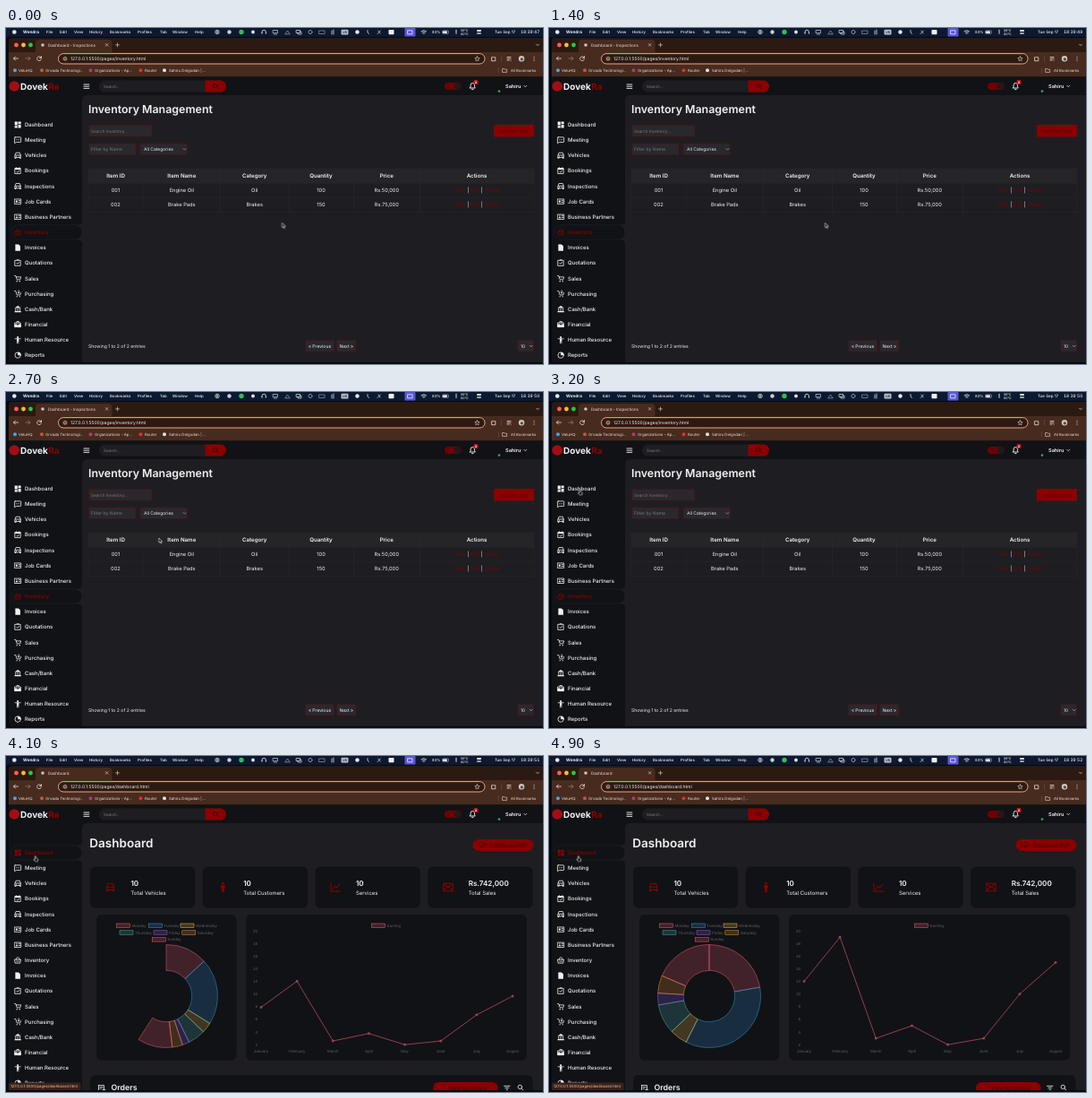
Animation of 600 by 375 pixels, one loop 5000 ms. Source, as an HTML page:

```html
<!DOCTYPE html>
<html lang="en">
<head>
<meta charset="utf-8">
<title>Dashboard</title>
<style>
html, body { margin: 0; width: 100%; height: 100%; overflow: hidden; background: #050a14; }
svg { display: block; width: 100vw; height: 100vh; color: #f1f1f4; fill: currentColor;
  font-family: Inter, "Open Sans", sans-serif; text-rendering: geometricPrecision; }
text { white-space: pre; }
.b { font-weight: 600; }
.h { font-weight: 700; }
.n { font-weight: 500; }
.m { text-anchor: middle; }
.e { text-anchor: end; }
.s { fill: none; stroke: currentColor; stroke-width: .8; stroke-linecap: round; stroke-linejoin: round; }
.arial { font-family: "Liberation Sans", Arial, sans-serif; fill: #5b5c60; }
.num { font-feature-settings: "tnum"; }

.old, .new, .idle, .hover, .url1, .url2, .load, .rest, .arrow, .hand, .leave, .enter, #mouse {
  animation: 5s step-end infinite; }
.old { animation-name: until78; }
.new { animation-name: from78; }
.idle { animation-name: until66; }
.hover { animation-name: from66; }
.url1 { animation-name: until74; }
.url2 { animation-name: from74; }
.load { animation-name: loading; }
.rest { animation-name: notloading; }
.arrow { animation-name: until62; }
.hand { animation-name: from62; }
.leave { animation-name: leave; }
.enter { animation-name: enter; }
#mouse { animation-name: travel; animation-timing-function: ease-in-out; }
@keyframes until78 { 0% { opacity: 1 } 78%, 100% { opacity: 0 } }
@keyframes from78 { 0% { opacity: 0 } 78%, 100% { opacity: 1 } }
@keyframes until66 { 0% { opacity: 1 } 66%, 100% { opacity: 0 } }
@keyframes from66 { 0% { opacity: 0 } 66%, 100% { opacity: 1 } }
@keyframes until74 { 0% { opacity: 1 } 74%, 100% { opacity: 0 } }
@keyframes from74 { 0% { opacity: 0 } 74%, 100% { opacity: 1 } }
@keyframes until62 { 0% { opacity: 1 } 62%, 100% { opacity: 0 } }
@keyframes from62 { 0% { opacity: 0 } 62%, 100% { opacity: 1 } }
@keyframes loading { 0% { opacity: 0 } 74% { opacity: 1 } 78%, 100% { opacity: 0 } }
@keyframes notloading { 0% { opacity: 1 } 74% { opacity: 0 } 78%, 100% { opacity: 1 } }
@keyframes leave { 0% { color: #8b0000 } 78%, 100% { color: #f1f1f4 } }
@keyframes enter { 0% { color: #f1f1f4 } 78%, 100% { color: #8b0000 } }
@keyframes travel {
  0%, 46% { transform: translate(308.5px, 217.5px) }
  62%, 65% { transform: translate(34.4px, 108.8px) }
  70%, 100% { transform: translate(32.9px, 111.6px) }
}
</style>
</head>
<body>
<svg id="stage" viewBox="0 0 600 375" preserveAspectRatio="none"></svg>
<script>
const PANEL = '#111215', MAIN = '#1e1e22', RED = '#8b0000', DIM = '#4a0709';

const text = (x, y, s, size, cls = '', fill = 'currentColor') =>
  `<text x="${x}" y="${y}" font-size="${size}" class="${cls}" style="fill:${fill}">${s}</text>`;
const label = (x, y, s, cls = '') => `<text x="${x}" y="${y}" font-size="4.5" class="arial ${cls}">${s}</text>`;
const rect = (x, y, w, h, fill, r = 0, more = '') =>
  `<rect x="${x}" y="${y}" width="${w}" height="${h}" rx="${r}" fill="${fill}" ${more}/>`;
const dot = (x, y, r, fill, more = '') => `<circle cx="${x}" cy="${y}" r="${r}" fill="${fill}" ${more}/>`;
const line = (d, color = 'currentColor', w = .8) =>
  `<path d="${d}" class="s" style="stroke:${color};stroke-width:${w}"/>`;
const group = (cls, body, color) => `<g class="${cls}"${color ? ` color="${color}"` : ''}>${body}</g>`;
const icon = (x, y, [solid, stroke], scale = 1) =>
  `<g transform="translate(${x} ${y}) scale(${scale})"><path d="${solid}"/><path class="s" d="${stroke}"/></g>`;
const box = (x, y, w, h) => rect(x, y, w, h, '#29292d', 1, 'stroke="#5e080b" stroke-width=".6"');
const chevron = (x, y, c) => line(`M${x - 1.5} ${y - .7}l1.5 1.5 1.5-1.5`, c, .7);
const lens = (x, y, c) => line(`M${x + 1.2} ${y + 1.2}l2 2M${x + 1.5} ${y - .6}a2.2 2.2 0 1 0-4.4 0 2.2 2.2 0 0 0 4.4 0z`, c);

// [name, solid path, stroked path], drawn around 0,0
const car = ['M-3.5 2.2h1.7v1.4h-1.7zM1.8 2.2h1.7v1.4h-1.7z',
  'M-3.1-.2l1-2.8h4.2l1 2.8v2.5h-6.2zM-3-.2h6M-1.8 1.1h.2M1.7 1.1h.2'];
const items = [
  ['Dashboard', 'M-3.5-3.5h3.1v4h-3.1zM.4-3.5h3.1v2.5H.4zM-3.5 1.3h3.1v2.2h-3.1zM.4-.2h3.1v3.7H.4z', ''],
  ['Meeting', '', 'M-3-3.2h6q.5 0 .5.6v4.4q0 .6-.5.6h-4.6l-2 1.2v-6.2q0-.6.6-.6zM-1.6-.3h.1M0-.3h.1M1.6-.3h.1'],
  ['Vehicles', ...car],
  ['Bookings', 'M-3-3h6v1.8h-6z', 'M-3-2.8h6v6h-6zM-1.7-3.6v.8M1.7-3.6v.8M-1.2 1l.9.9 1.6-1.7'],
  ['Inspections', ...car],
  ['Job Cards', 'M-2.4-1.2h2v2.4h-2z', 'M-3.5-2.7h7v5.4h-7zM.9-1h1.5M.9.8h1.5'],
  ['Business Partners', 'M-2.4.2h2.2v1.3h-2.2zM-1.9-1.5h1.2v1.3h-1.2z', 'M-3.5-2.7h7v5.4h-7zM1-1.1h1.4M1 .7h1.4'],
  ['Inventory', '', 'M-3.4-.8h6.8l-.8 4h-5.2zM-2-.8l1.3-2.4M2-.8L.7-3.2M-1 .8v1M1 .8v1'],
  ['Invoices', 'M-2.8-3.6h3.5l2.1 2.1v5.1h-5.6z', ''],
  ['Quotations', '', 'M-3-2.9h6v6h-6zM-1.3.1l1 1 1.8-2M-1-3.5h2'],
  ['Sales', 'M-1.6 2.6h1.2v1.2h-1.2zM1.5 2.6h1.2v1.2H1.5z', 'M-3.6-3h1.2l1.4 4.4h3.6l.9-2.9h-5.3'],
  ['Purchasing', 'M-1.6 2.6h1.2v1.2h-1.2zM1.5 2.6h1.2v1.2H1.5z', 'M-3.6-3h1.2l1.4 4.4h3.6l.9-2.4M1-3.6v3M-.1-1.5L1-.5l1.1-1'],
  ['Cash/Bank', 'M-3.6-1.2L0-3.6l3.6 2.4zM-3.6 2.3h7.2v1.3h-7.2z', 'M-2.4-.6v2.6M0-.6v2.6M2.4-.6v2.6'],
  ['Financial', 'M-3.5-.3h2.8v1H.7v-1h2.8v3.4h-7z', 'M-3.2-1.8h6.4v4.6h-6.4zM-1.2-2v-1.3h2.4V-2'],
  ['Human Resource', 'M-.9-3.8h1.8V-2H-.9zM-1.1-1.4h2.2v3.2h-2.2z', 'M-3-1.2h6M-.7 1.5v2.3M.7 1.5v2.3'],
  ['Reports', 'M0-3.4A3.4 3.4 0 0 1 3.4 0H0z', 'M3.2 0A3.2 3.2 0 1 1 0-3.2 3.2 3.2 0 0 1 3.2 0z'],
];
const rowY = i => 107.9 + i * 17.15;
const ring = y => `<path fill="${MAIN}" d="M85.2 ${y - 13.5}q0 5-5 5H14a8.5 8.5 0 0 0 0 17h66.2q5 0 5 5z"/>`
  + rect(6.2, y - 7.7, 78.4, 15.4, PANEL, 7.7);

function menuBar() {
  const menus = [[45, 'File'], [60, 'Edit'], [76, 'View'], [93, 'History'], [116, 'Bookmarks'],
    [147, 'Profiles'], [172, 'Tab'], [186, 'Window'], [211, 'Help']];
  const pale = '#dfe3ea';
  return rect(0, 0, 600, 10, '#0c1930') + dot(9.3, 4.5, 2.3, '#e8eaf0')
    + text(19, 6.1, 'Wendra', 4.7, 'h')
    + menus.map(([x, s]) => text(x, 6.1, s, 4.35, 'n')).join('')
    + dot(236, 4.5, 2.2, 'none', 'stroke="#eee" stroke-width=".8"') + dot(236, 4.5, 1, '#eee')
    + dot(249.5, 4.5, 2.2, '#c9ced8') + dot(263, 4.5, 2.7, '#2fbf54') + dot(276, 4.5, 1.9, pale)
    + line('M286 5.5v-1a2.2 2.2 0 0 1 4.4 0v1M286 5.2v1M290.4 5.2v1')
    + line('M298.5 2.5h5v3.2h-5zM299.5 7h3', '#c9ced8', .7)
    + line('M312 6.5l2.5-3.5 2.5 3.5z', '#98a0b0', .7)
    + line('M324.5 2.5h4v3h-4zM326 5.5V7h4V4h-1.5', pale, .7)
    + dot(340, 4.5, 2, 'none', `stroke="${pale}" stroke-width="1" stroke-dasharray="1 .5"`)
    + line('M350 3h6v3.5h-6z', '#aab', .6) + line('M364 3v4M366 2v5', pale)
    + rect(374.5, 1.8, 8, 5.6, '#b9c0cd', 1) + text(378.5, 6.2, 'US', 3.7, 'm b', '#14203a')
    + dot(392.5, 4.5, 2.2, '#e8eaf0') + line('M404 2.5V5l1.5 1.5', pale)
    + line('M415 6.5l3.5-3.5M416 3l2 3', pale, .7) + rect(427.5, 2, 6, 5.2, '#f0f1f4', .8)
    + rect(445.5, 0, 12, 9.5, '#5a55d8', 1.2) + line('M449 2.8h5v4h-5z', '#fff', .7)
    + line('M464 3.8q2.8-2.4 5.6 0M465.3 5.2q1.5-1.2 3 0M466.8 6.5h.1', '#fff')
    + text(476, 6.1, '83%', 4.2, 'n')
    + rect(487.5, 2.8, 7, 3.6, 'none', 1, 'stroke="#ccd" stroke-width=".5"') + rect(488.1, 3.4, 4.8, 2.4, '#fff', .4)
    + line('M503 2.2v3.2M503 6.3h.1', pale, 1)
    + text(508, 4.1, '56°C', 3.5, 'n') + text(508, 7.8, '60°C', 3.5, 'n')
    + rect(526, 2, 5, 2, '#e8eaf0', 1) + rect(526, 5, 5, 2, '#9aa3b5', 1)
    + text(546, 6.1, 'Tue Sep 17', 4.5, 'n')
    + `<text x="575" y="6.1" font-size="4.8" class="n num">18<tspan class="sep">:</tspan>39<tspan class="sep">:</tspan><tspan id="sec">47</tspan></text>`;
}

function browser() {
  const host = '127.0.0.1:5500/pages/', tint = '#f0dcd2';
  const marks = [[14, 'VeluHQ', '#4aa3e8', 10], [44, 'Orvada Technologi...', '#c9543c', 40],
    [99, 'Organizations - Ap...', '#b03a6a', 94.5], [155, 'Router', '#e02f2f', 150.5], [182, 'Sahiru Delgodan | ...', '#e8e0dc', 177]];
  return `<path fill="#2b1a12" d="M3 30V15q0-4 4-4h593v19z"/>`
    + ['#fe5f57', '#febc2e', '#28c840'].map((c, i) => dot(11.5 + i * 8, 19, 2.4, c)).join('')
    + rect(33, 13, 85.5, 18, '#472b1f', 4) + rect(3, 27, 597, 27.5, '#472b1f')
    + dot(41, 19, 1.8, 'none', 'class="load" stroke="#e8a88c" stroke-width=".7" stroke-dasharray="8 4"')
    + group('rest', dot(41, 19, 1.8, '#cfc4be'))
    + group('url1', text(47, 20.7, 'Dashboard - Inspections', 4.55, '', tint))
    + group('load', text(47, 20.7, host + 'dashb', 4.55, '', tint))
    + group('new', text(47, 20.7, 'Dashboard', 4.55, '', tint))
    + line('M111.3 17.5l2.6 2.6M113.9 17.5l-2.6 2.6M122.5 18.9h4M124.5 16.9v4', tint, .6) + chevron(594, 18.8, tint)
    + line('M13.5 34h-5M10.5 32l-2 2 2 2', tint) + line('M22 34h5M25 32l2 2-2 2', '#98786a')
    + group('rest', line('M39.3 33.2a2.4 2.4 0 1 0 .1 1.7M39.5 31.5v1.9h-1.9', tint))
    + group('load', line('M34.7 32l4 4M38.7 32l-4 4', tint))
    + rect(58.5, 28.6, 476.5, 11.4, '#2b1a12', 5.7, 'stroke="#f0a586" stroke-width="1"')
    + dot(66, 34.3, 3.3, '#472b1f') + dot(66, 34.3, 1.7, 'none', `stroke="${tint}" stroke-width=".6"`) + line('M66 34.2v.8', tint, .5)
    + group('url1', text(72, 36, host + 'inventory.html', 5, '', '#f6ebe6'))
    + group('url2', text(72, 36, host + 'dashboard.html', 5, '', '#f6ebe6'))
    + line('M526.5 31.7l.8 1.7 1.8.2-1.3 1.3.3 1.8-1.6-.9-1.6.9.3-1.8-1.3-1.3 1.8-.2z', tint, .6)
    + line('M543 32.7h1.2q.3-1.2 1.2 0h1.4v4H543zM560 32.5h4M560 34.3h4M560 36.1h2M564 36.3h.1', tint)
    + line('M553.5 31.5V37', '#7a5646', .5) + dot(576, 34.3, 3.2, '#cfc6c0') + dot(576.3, 34.8, 1.6, '#4d4a4c')
    + [-2, 0, 2].map(d => dot(590, 34.3 + d, .55, tint)).join('')
    + marks.map(([x, s, c, cx]) => dot(cx, 47.2, 2, c) + text(x, 48.9, s, 4.35, '', tint)).join('')
    + line('M550.5 44.5V50', '#7a5646', .5) + line('M555 45.5h1.7l.6.7h2.3v3.2H555z', tint, .6)
    + text(564, 48.9, 'All Bookmarks', 4.2, '', tint);
}

function topBar() {
  return rect(3, 54.5, 597, 318.5, PANEL)
    + `<path fill="${MAIN}" d="M91 75h509v298H85V81q0-6 6-6z"/>`
    + dot(9.2, 65, 5.8, '#a30d12') + text(16, 68.5, 'Dovek', 10, 'h') + text(47.3, 68.5, 'Ra', 10, 'h', RED)
    + line('M87 63h5.8M87 65.2h5.8M87 67.4h5.8', undefined, .9)
    + rect(104, 58.6, 142, 13, MAIN, 6.5)
    + `<path fill="${RED}" d="M222.5 58.6h17a6.5 6.5 0 0 1 0 13h-17z"/>` + lens(234.5, 65, '#2a0a0c')
    + text(109, 66.7, 'Search...', 4.5, '', '#7c7c82')
    + rect(490, 61, 18.5, 8, '#6d0204', 4) + dot(504.3, 65, 3.5, '#1b1b1f')
    + line('M518.3 67h6l-.8-1.3v-2a2.2 2.2 0 0 0-4.4 0v2zM520.5 68.6h1.6', undefined, .9)
    + dot(525, 60.5, 2.7, '#c41217') + text(525, 61.8, '8', 3.4, 'm b')
    + dot(551, 70.6, 1.3, '#2fae4a') + text(558, 67, 'Sahiru', 5.6, 'b') + chevron(580.3, 65, '#f1f1f4');
}

function sidebar() {
  const change = { 0: 'enter', 7: 'leave' };
  return group('idle', ring(rowY(7))) + group('hover', ring(rowY(0)))
    + items.map(([name, ...art], i) =>
      group(change[i] || '', icon(13.2, rowY(i), art) + text(21, rowY(i) + 2.1, name, 6, 'n'))).join('');
}

function inventory() {
  const cols = [122.5, 196.3, 277.7, 352, 425.3, 526];
  const rows = [['001', 'Engine Oil', 'Oil', '100', 'Rs.50,000'], ['002', 'Brake Pads', 'Brakes', '150', 'Rs.75,000']];
  const cells = (r, y) => r.map((s, i) => text(cols[i], y, s, 5.75, 'm')).join('')
    + [[507, 'View'], [523.7, 'Edit'], [543, 'Delete']].map(([x, s]) => text(x, y, s, 5.5, 'm', '#730406')).join('')
    + text(516.3, y, '|', 5.8, 'm') + text(531.2, y, '|', 5.8, 'm');
  return text(92, 94.7, 'Inventory Management', 12.4, 'b')
    + box(92.3, 108.5, 70.7, 12.7) + text(95, 116.5, 'Search Inventory...', 4.65, '', '#77777c')
    + rect(545, 108, 45, 13.5, RED, 1) + text(567.7, 116.6, 'Add New Item', 5, 'm', DIM)
    + box(92.3, 129, 52.7, 12.7) + text(95, 137.1, 'Filter by Name', 5.1, '', '#77777c')
    + box(149.8, 129, 52.7, 12.7) + text(154, 137.1, 'All Categories', 5, '', '#e8e8ec') + chevron(199.5, 135.3, '#9aa39a')
    + rect(92, 156.5, 498, 16.7, '#252527')
    + ['Item ID', 'Item Name', 'Category', 'Quantity', 'Price', 'Actions'].map((s, i) => text(cols[i], 167, s, 6.15, 'm b')).join('')
    + line('M92 173.2h498M92 189.3h498M92 205.5h498', '#2b2b2f', .5)
    + line([92, 153, 239.5, 316.5, 388.5, 462.5, 590].map(x => `M${x} 157v48.5`).join(''), '#2b2b2f', .5)
    + rows.map((r, i) => cells(r, 183 + i * 16.2)).join('')
    + text(92, 356.7, 'Showing 1 to 2 of 2 entries', 5.1)
    + box(334.3, 348.3, 32.5, 13) + text(350.5, 356.7, '« Previous', 5.1, 'm')
    + box(369.3, 348.3, 21.7, 13) + text(380.2, 356.7, 'Next »', 5.1, 'm')
    + box(571.3, 348.3, 18.4, 13) + text(575, 356.7, '10', 4.9) + chevron(586.8, 355, '#b5b5ba');
}

const hues = ['255,99,132', '54,162,235', '255,206,86', '75,192,192', '153,102,255', '255,159,64', '255,99,132'];
const sales = [12, 19, 3, 5, 2, 3, 10, 15];
const paint = i => `fill="rgba(${hues[i]},.2)" stroke="rgb(${hues[i]})" stroke-width=".45"`;
const swatch = (x, y, i) => `<rect x="${x}" y="${y}" width="15" height="4.5" ${paint(i)}/>`;

function dashboard() {
  const cards = [['10', 'Total Vehicles', car],
    ['10', 'Total Customers', ['M-.9-4.3H.9v1.8H-.9zM-1.7-2h3.4v3H1v3.5h-2V1h-.7z', '']],
    ['10', 'Services', ['', 'M-4-3.5v7h8M-2.5 1.5l2-2.5 1.7 1.3 2.5-3']],
    ['Rs.742,000', 'Total Sales', ['', 'M-4-3.3h8v6.6h-8zM-3.8-3l3.8 3 3.8-3M-3.8 3l2.5-3M3.8 3L1.3 0']]];
  const days = [[123.5, 187, 'Monday'], [159.3, 187, 'Tuesday'], [195, 187, 'Wednesday'], [127, 194.8, 'Thursday'],
    [165, 194.8, 'Friday'], [196.8, 194.8, 'Saturday'], [163.2, 202.6, 'Sunday']];
  const months = ['January', 'February', 'March', 'April', 'May', 'June', 'July', 'August'];
  const card = ([value, name, art], i) => {
    const x = 94 + i * 125.75;
    return rect(x, 123.5, 117.3, 46.3, PANEL, 6) + group('', icon(x + 22.7, 146.5, art, 1.3), RED)
      + text(x + 45.4, 144.8, value, 8.1, 'b') + text(x + 45.4, 155.1, name, 6);
  };
  return text(93.3, 102, 'Dashboard', 13.5, 'b')
    + rect(521.5, 93, 68, 13, RED, 6.5)
    + line('M530 100.8h-.8a1.7 1.7 0 0 1 .2-3.2 2.5 2.5 0 0 1 4.7 0 1.7 1.7 0 0 1 .2 3.2h-.8M531.8 99v3.3M530.6 101.2l1.2 1.2 1.2-1.2', DIM)
    + text(541, 101.6, 'Download PDF', 5.9, 'n', DIM)
    + cards.map(card).join('')
    + rect(101, 177, 156.5, 162.7, PANEL, 6) + rect(268, 177, 314, 162.7, PANEL, 6)
    + days.map(([x, y, s], i) => swatch(x, y, i) + label(x + 17, y + 3.8, s)).join('')
    + hues.map((_, i) => `<path class="slice" ${paint(i)}/>`).join('')
    + swatch(408.5, 187, 0) + label(425.5, 190.8, 'Earning')
    + Array.from({ length: 10 }, (_, i) => label(281, 323.6 - i * 14.1, 2 + 2 * i, 'e')).join('')
    + months.map((s, i) => label(285 + i * 40.15, 331, s, 'm')).join('')
    + `<path id="trend" fill="none" stroke="rgb(255,99,132)" stroke-width=".55"/>`
    + sales.map(() => `<circle class="pt" r="1.1" fill="#7a3846" stroke="rgb(255,99,132)" stroke-width=".4"/>`).join('')
    + rect(94, 356, 494.5, 30, PANEL, 6)
    + icon(107, 370.5, ['', 'M-3.5-3h6v3M-3.5-3v6h3M-2-1h3M-2 .8h1.5M.8 1.8h3M2.3.5v3'])
    + text(117.5, 373.3, 'Orders', 8.8, 'b')
    + rect(477, 364, 72.7, 13, RED, 6.5) + text(494, 372.6, 'View All Orders', 5.9, 'n', DIM)
    + line('M556.5 368.3h6.5M557.8 370.3h3.9M559 372.3h1.5') + lens(575, 370);
}

const status = rect(3, 364.5, 80.5, 8.5, '#3a2218', 1.5)
  + text(5, 370.3, '127.0.0.1:5500/pages/dashboard.html', 4.27, '', '#f0c4ae');
const mouse = '<g id="mouse" fill="#0a0a0c" stroke="#f4f4f4" stroke-width=".6" stroke-linejoin="round">'
  + '<path class="arrow" d="M0 0v5.2l1.2-1.1.9 2 .9-.4-.9-1.9h1.7z"/>'
  + '<path class="hand" d="M0 0q.7 0 .7.7v1.9l1.7.5q.6.2.5.9l-.5 2h-2.8l-1.7-2.1q.4-.7 1.4.1V.7Q-.7 0 0 0z"/></g>';

const stage = document.getElementById('stage');
stage.innerHTML = '<clipPath id="page"><rect x="3" y="54" width="597" height="319"/></clipPath>'
  + rect(0, 0, 600, 375, '#050a14') + menuBar() + browser()
  + `<g clip-path="url(#page)">${topBar()}${group('old', inventory())}${group('new', dashboard())}${sidebar()}${group('hover', status)}</g>`
  + mouse;

const all = s => [...stage.querySelectorAll(s)];
const slices = all('.slice'), points = all('.pt'), seps = all('.sep');
const trend = stage.querySelector('#trend'), sec = stage.querySelector('#sec');
const polar = (r, a) => `${(179 + r * Math.sin(a)).toFixed(2)} ${(268 - r * Math.cos(a)).toFixed(2)}`;

function drawCharts(p) {
  let a = 0;
  slices.forEach((el, i) => {
    const b = a + sales[i] / 54 * 2 * Math.PI * p;
    el.setAttribute('d', `M${polar(57.5, a)}A57.5 57.5 0 0 1 ${polar(57.5, b)}L${polar(28.7, b)}A28.7 28.7 0 0 0 ${polar(28.7, a)}z`);
    a = b;
  });
  const xy = sales.map((v, i) => [285 + i * 40.15, 322.2 - (v - 2) * 7.06 * p]);
  trend.setAttribute('d', 'M' + xy.map(q => q.join(' ')).join('L'));
  points.forEach((el, i) => { el.setAttribute('cx', xy[i][0]); el.setAttribute('cy', xy[i][1]); });
}

let start;
function frame(now) {
  start ??= now;
  const t = Math.floor((now - start) % 5000 / 100) * 100;
  const s = 47 + Math.floor((t + 700) / 1000);
  sec.textContent = s;
  seps.forEach(el => el.setAttribute('fill-opacity', s % 2)); // separators blink on odd seconds
  const k = Math.min(1, Math.max(0, (t - 3900) / 1000));
  drawCharts(1 - (1 - k) ** 4);
  requestAnimationFrame(frame);
}
requestAnimationFrame(frame);
</script>
</body>
</html>
```
